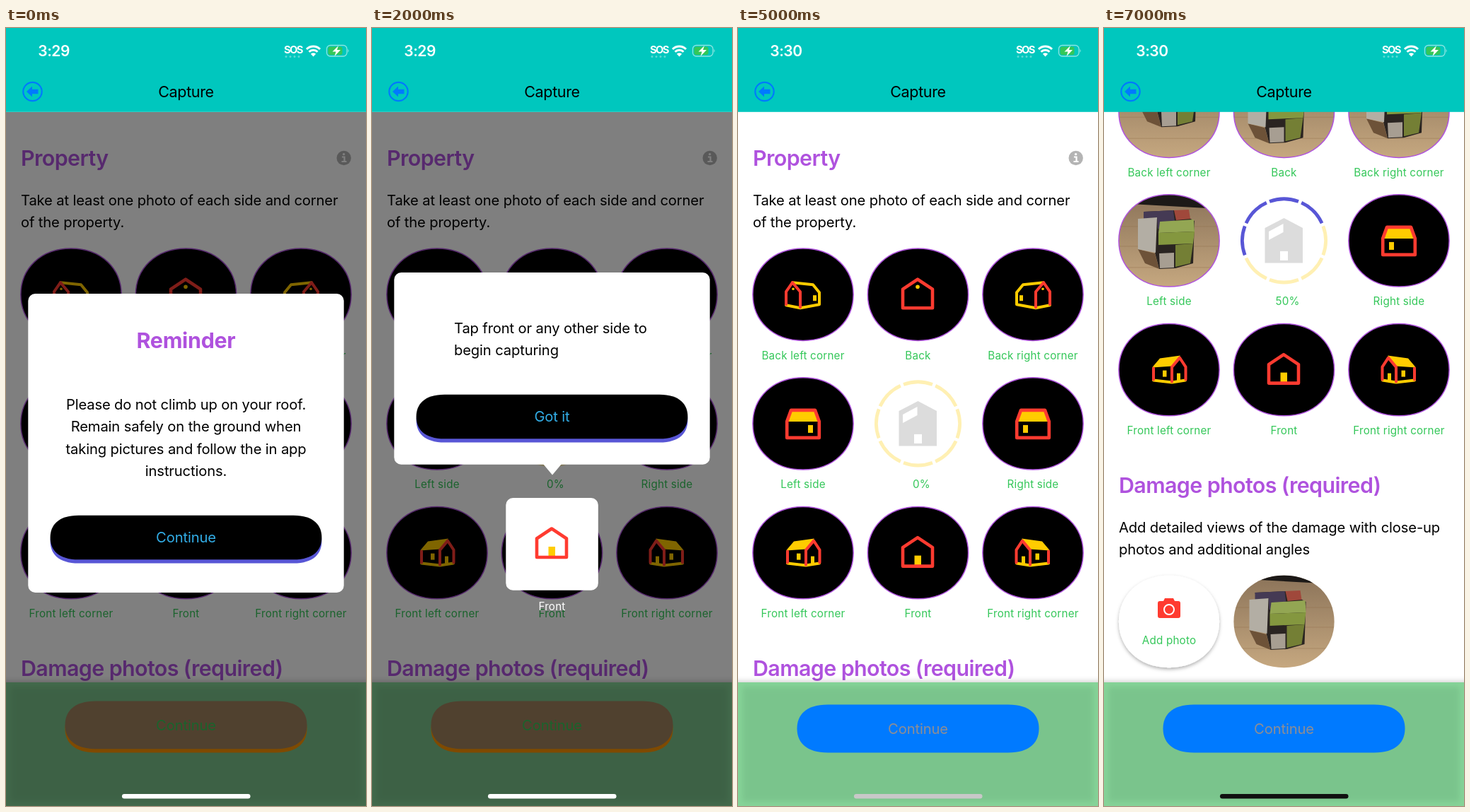
An HTML page that plays this animation: 509 by 1101 pixels, repeating every 8000 ms.

```html
<!DOCTYPE html>
<html lang="en">
<head>
<meta charset="utf-8">
<title>Capture</title>
<style>
  html, body { margin: 0; height: 100%; overflow: hidden; background: #fff; }
  svg { display: block; width: 100%; height: 100%; }
  text { font-family: Inter, sans-serif; font-optical-sizing: none; }
  .body { font-size: 20.2px; letter-spacing: -.14px; }
  .title { font-size: 21.5px; letter-spacing: -.35px; }
  .head { font-size: 30.4px; letter-spacing: -.6px; font-weight: 600; fill: #af52de; }
  .strong { font-weight: 700; letter-spacing: -.3px; }
  .label { font-size: 15.2px; letter-spacing: .2px; fill: #34c759; }
  .clock { font-size: 21px; letter-spacing: -.5px; font-weight: 600; fill: #fff; }
  .sos { font-size: 14.8px; letter-spacing: -1.7px; font-weight: 700; fill: #fff; }
  .mid { text-anchor: middle; }
  .line { fill: none; stroke-width: 4.6; stroke-linejoin: round; stroke-linecap: round; }
  .thin { stroke-width: 4; }
  .red { stroke: #ff3b30; }
  .yellow { stroke: #fc0; }
  .gold { fill: #fc0; }
</style>
</head>
<body>
<svg id="stage" viewBox="0 0 509 1101" preserveAspectRatio="none"></svg>
<script>
const STEP = 1000, STEPS = 8, SCROLL = 259, BUTTON_DEPTH = 5.2, HEADER = 118.8;
const COLS = [92, 254.5, 417], ROWS = [377.2, 559.9, 742.6];

const text = (cls, x, y, str, attrs = '') => `<text class="${cls}" x="${x}" y="${y}" ${attrs}>${str}</text>`;
const rect = (x, y, w, h, fill, r = 0, attrs = '') =>
  `<rect x="${x}" y="${y}" width="${w}" height="${h}" rx="${r}" fill="${fill}" ${attrs}/>`;
const poly = (points, fill) => `<polygon points="${points}" fill="${fill}"/>`;
const line = (cls, d) => `<path class="line ${cls}" d="${d}"/>`;
const at = (x, y, body, mirror) => `<g transform="translate(${x} ${y})${mirror ? ' scale(-1 1)' : ''}">${body}</g>`;

// Pill with continuous corners, where the curve runs further along the long side.
function pillPath(x, y, w, h) {
  const r = h / 2, a = Math.min(w / 2, 1.28 * r), p = (2.344 * r - a) / 3, q = .448 * r;
  const X = x + w, Y = y + h, m = y + r;
  return `M${x + a} ${y}H${X - a}C${X - p} ${y} ${X} ${y + q} ${X} ${m}` +
    `C${X} ${Y - q} ${X - p} ${Y} ${X - a} ${Y}H${x + a}` +
    `C${x + p} ${Y} ${x} ${Y - q} ${x} ${m}C${x} ${y + q} ${x + p} ${y} ${x + a} ${y}Z`;
}
const pill = (x, y, w, h, fill) => `<path d="${pillPath(x, y, w, h)}" fill="${fill}"/>`;
const TILE = pillPath(-71.1, -65.2, 142.2, 130.4);

const BUTTON = {
  normal: ['#000', '#5856d6', '#32ade6'],
  disabled: ['#a2845e', '#ff9500', '#34c759'],
  pressed: ['#007aff', 'none', '#8e8e93'],
};
function button(x, y, w, h, label, look) {
  const [fill, edge, ink] = BUTTON[look], low = y + BUTTON_DEPTH;
  const top = look === 'pressed' ? low : y;
  return pill(x, low, w, h, edge) + pill(x, top, w, h, fill) +
    text('body mid', 254.5, top + h / 2 + 7.2, label, `fill="${ink}"`);
}

const gable = line('red', 'M-21.5 19V-7.5L-.5-21.5 20.5-7.5V19Z');
const icons = {
  front: rect(-5, 4, 9.5, 14, '#fc0') + gable,
  back: gable + '<circle class="gold" cx="-.5" cy="-11" r="2.8"/>',
  side: poly('-22,-3 -17,-19 17,-19 22,-3', '#fc0') + rect(7, 2, 7, 11, '#fc0') +
    line('red', 'M-22.8 20V-3L-17-19H17L22.8-3V20Z'),
  frontCorner: poly('-24,-3 -13,-16 16,-20 5,-5', '#fc0') +
    line('thin yellow', 'M-22 15 4 18 23 15') +
    line('thin red', 'M-22-2V14M4-4V17M5-5 15-17 23.5-4V14') +
    rect(-9, 1, 5.5, 9, '#fc0') + rect(11, 5, 5, 12, '#fc0'),
  backCorner: line('thin yellow', 'M-15-17 14-14 23-3V14L-4 19-24 15') +
    line('thin red', 'M-24 14V-4L-15-17-4-4V18') +
    rect(14, 1, 5, 8, '#fc0') + '<circle class="gold" cx="-14" cy="-8" r="1.8"/>',
};

// Simplified photo of stone blocks on a wooden table.
const photo = (dx, dy, horizon) => `<g clip-path="url(#tile)">
  ${rect(-72, -66, 144, 132, 'url(#wood)')}
  <path d="M-72 ${horizon - 73}L72 ${horizon - 65}V-66H-72Z" fill="#1c1917"/>
  <path d="M-72-20H72M-72 8H72M-72 38H72" stroke="#8c6c48" stroke-opacity=".4"/>` +
  at(dx, dy, poly('-44,12 -20,18 -14,40 -34,32', '#6d5238') +
    poly('-36,-41 8,-43 36,-28 34,32 9,39 -14,40 -20,17', '#2a2421') +
    poly('-36,-41 6,-43 8,-27 -3,-15 -16,-17 -17,-33 -36,-31', '#453a54') +
    poly('7,-43 28,-44 30,-31 10,-29', '#a0483b') +
    poly('-44,-31 -17,-33 -19,17 -44,12', '#b3aea4') +
    poly('-13,-27 35,-30 36,-13 -15,-11', '#93a653') +
    poly('-15,-11 36,-13 34,4 -15,6', '#84973f') +
    poly('9,6 34,4 30,32 9,37', '#747f35') +
    poly('-14,18 7,17 7,38 -13,39', '#a79e92')) + '</g>';

const outline = `<path d="${TILE}" fill="none" stroke="#af52de" stroke-width="1.5"/>`;
const tile = (icon, mirror) => `<path d="${TILE}"/>` + at(0, 0, icon, mirror) + outline;

function progress(done) {
  const point = deg => {
    const a = deg * Math.PI / 180;
    return `${(59 * Math.cos(a)).toFixed(2)} ${(59 * Math.sin(a)).toFixed(2)}`;
  };
  let ring = '';
  for (let i = 0; i < 8; i++) {
    const mid = 180 + 45 * i;
    ring += `<path d="M${point(mid - 20.3)}A59 59 0 0 1 ${point(mid + 20.3)}" fill="none"
      stroke="${i < done ? '#5856d6' : '#fff0b3'}" stroke-width="4.8"/>`;
  }
  return ring + poly('-27,-18 0,-32 26.5,-18 26.5,31.5 -27,31.5', '#dcdcdc') +
    poly('-21.5,-13 -1,-24 -1,-12 -21.5,-1', '#fff') + rect(-5.5, 15, 11, 13, '#fff') +
    text('label mid', 5, 91.5, done * 12.5 + '%');
}

function grid(captured) {
  const cells = [
    ['Back left corner', icons.backCorner, false, [3, -18, 10]],
    ['Back', icons.back, false, [-7, 5, 8]],
    ['Back right corner', icons.backCorner, true, [-2, -2, 8]],
    ['Left side', icons.side, false, [0, 0, 20]],
    null,
    ['Right side', icons.side, true],
    ['Front left corner', icons.frontCorner, false],
    ['Front', icons.front, false],
    ['Front right corner', icons.frontCorner, true],
  ];
  return cells.map((cell, i) => {
    let body = progress(captured);
    if (cell) {
      const [label, icon, mirror, shot] = cell;
      body = (i < captured && shot ? photo(...shot) + outline : tile(icon, mirror)) +
        text('label mid', 0, 91.5, label);
    }
    return at(COLS[i % 3], ROWS[Math.floor(i / 3)], body);
  }).join('');
}

const addPhoto = `<path d="${TILE}" fill="#fff" filter="url(#lift)"/>` +
  `<path d="M-16-26q0-3 3-3h5l2-4H6l2 4h5q3 0 3 3V-8q0 3-3 3h-26q-3 0-3-3Z" fill="#ff3b30"/>
   <circle cy="-17" r="7" fill="none" stroke="#fff" stroke-width="2"/>` +
  text('label mid', 0, 32, 'Add photo');

// The fifth cell is the progress ring, so four captures fill the cells before it.
const content = scrolled => at(0, scrolled ? -SCROLL : 0,
  text('head', 21, 195, 'Property') +
  `<circle cx="477.7" cy="184" r="10.2" fill="#b4b4b4"/>
   <path d="M475 182.5h3.5v6.5M474.5 189h7" fill="none" stroke="#fff" stroke-width="2.2"/>
   <circle cx="477.6" cy="178.6" r="1.7" fill="#fff"/>` +
  text('body', 21, 251, 'Take at least one photo of each side and corner') +
  text('body', 21, 282.3, 'of the property.') +
  grid(scrolled ? 4 : 0) +
  text('head', 21, 917, 'Damage photos (required)') +
  text('body', 21, 973, 'Add detailed views of the damage with close-up') +
  text('body', 21, 1004.3, 'photos and additional angles') +
  at(COLS[0], 1099, addPhoto) + at(COLS[1], 1099, photo(-5, 0, 12)));

const footer = look => rect(-10, 925, 529, 190, '#000', 0, 'opacity=".22" filter="url(#soft)"') +
  rect(0, 926, 509, 175, '#86d498') +
  `<g clip-path="url(#bar)">${rect(6, 932, 497, 163, '#7ac48c', 0, 'filter="url(#soft)"')}</g>` +
  button(83.5, 952.4, 342, 67.8, 'Continue', look);

const header = clock => rect(0, 0, 509, HEADER, '#00c7be') +
  text('clock', 45.3, 40, clock) + text('sos', 393, 36, 'SOS') +
  [396, 402, 408, 414].map(x => `<circle cx="${x}" cy="40.5" r="1.5" fill="#fff" opacity=".35"/>`).join('') +
  `<g fill="none" stroke="#fff" stroke-width="3">
     <path d="M425 30a13.4 13.4 0 0 1 19 0M428.5 33.8a8.5 8.5 0 0 1 12 0"/></g>
   <path d="M434.5 40.5l-3.6-3.8a5.2 5.2 0 0 1 7.2 0Z" fill="#fff"/>` +
  rect(453.5, 24.5, 28.5, 15.5, 'none', 5, 'stroke="#fff" stroke-opacity=".55" stroke-width="1.3"') +
  rect(455.5, 26.5, 20, 11.5, '#34c759', 3) +
  `<path d="M483.5 29.8q2.2 2.4 0 5Z" fill="#fff" opacity=".6"/>
   <path d="M470 25l-8.5 8.5h5l-2 6.5 8.5-9h-5Z" fill="#fff"/>
   <circle cx="37.5" cy="90" r="13.2" fill="none" stroke="#007aff" stroke-width="2.2"/>
   <path d="M29 90l8-7.5v4.2h8.5v6.6H37v4.2Z" fill="#007aff"/>` +
  text('title mid', 254.5, 98, 'Capture');

const dim = rect(0, HEADER, 509, 1101 - HEADER, '#000', 0, 'opacity=".5"');

const reminder = look => rect(31.3, 376, 446.4, 423, '#fff', 10) +
  text('head strong mid', 254.5, 453, 'Reminder') +
  ['Please do not climb up on your roof.', 'Remain safely on the ground when',
   'taking pictures and follow the in app', 'instructions.']
    .map((row, i) => text('body mid', 254.5, 540 + 31.3 * i, row)).join('') +
  button(62.6, 689.7, 383.8, 62.6, 'Continue', look);

const tip = look => rect(31.3, 346, 446.4, 271.7, '#fff', 10) + poly('242,617 268,617 255,632.5', '#fff') +
  text('body', 116, 432, 'Tap front or any other side to') + text('body', 116, 463.3, 'begin capturing') +
  button(62.6, 518.7, 383.8, 62.6, 'Got it', look) +
  rect(189.3, 665, 130.5, 130.7, '#fff', 10) + at(COLS[1], 730, icons.front) +
  text('label mid', 254.5, 823.7, 'Front', 'style="fill:#fff"');

const defs = `<defs>
  <clipPath id="tile"><path d="${TILE}"/></clipPath>
  <clipPath id="bar"><rect y="926" width="509" height="175"/></clipPath>
  <linearGradient id="wood" x2="0" y2="1"><stop stop-color="#8b7359"/><stop offset="1" stop-color="#c6a880"/></linearGradient>
  <filter id="soft"><feGaussianBlur stdDeviation="4"/></filter>
  <filter id="lift" x="-20%" y="-20%" width="140%" height="140%"><feDropShadow dx="0" dy="2.5" stdDeviation="2.5" flood-opacity=".3"/></filter>
</defs>`;

function scene(step) {
  const part = step >> 1, look = step % 2 ? 'pressed' : 'normal';
  const footerLook = part < 2 || step === 4 ? 'disabled' : look;
  return defs + rect(0, 0, 509, 1101, '#fff') + content(part === 3) + footer(footerLook) +
    (part < 2 ? dim : '') + header(part < 2 ? '3:29' : '3:30') +
    (part === 0 ? reminder(look) : part === 1 ? tip(look) : '') +
    rect(164, 1084, 181.5, 6.6, ['#fff', '#fff', '#c8c8c8', '#111'][part], 3.3);
}

const stage = document.getElementById('stage');
let shown = -1;
function frame() {
  const step = Math.floor(performance.now() / STEP) % STEPS;
  if (step !== shown) stage.innerHTML = scene(shown = step);
  requestAnimationFrame(frame);
}
frame();
</script>
</body>
</html>
```
